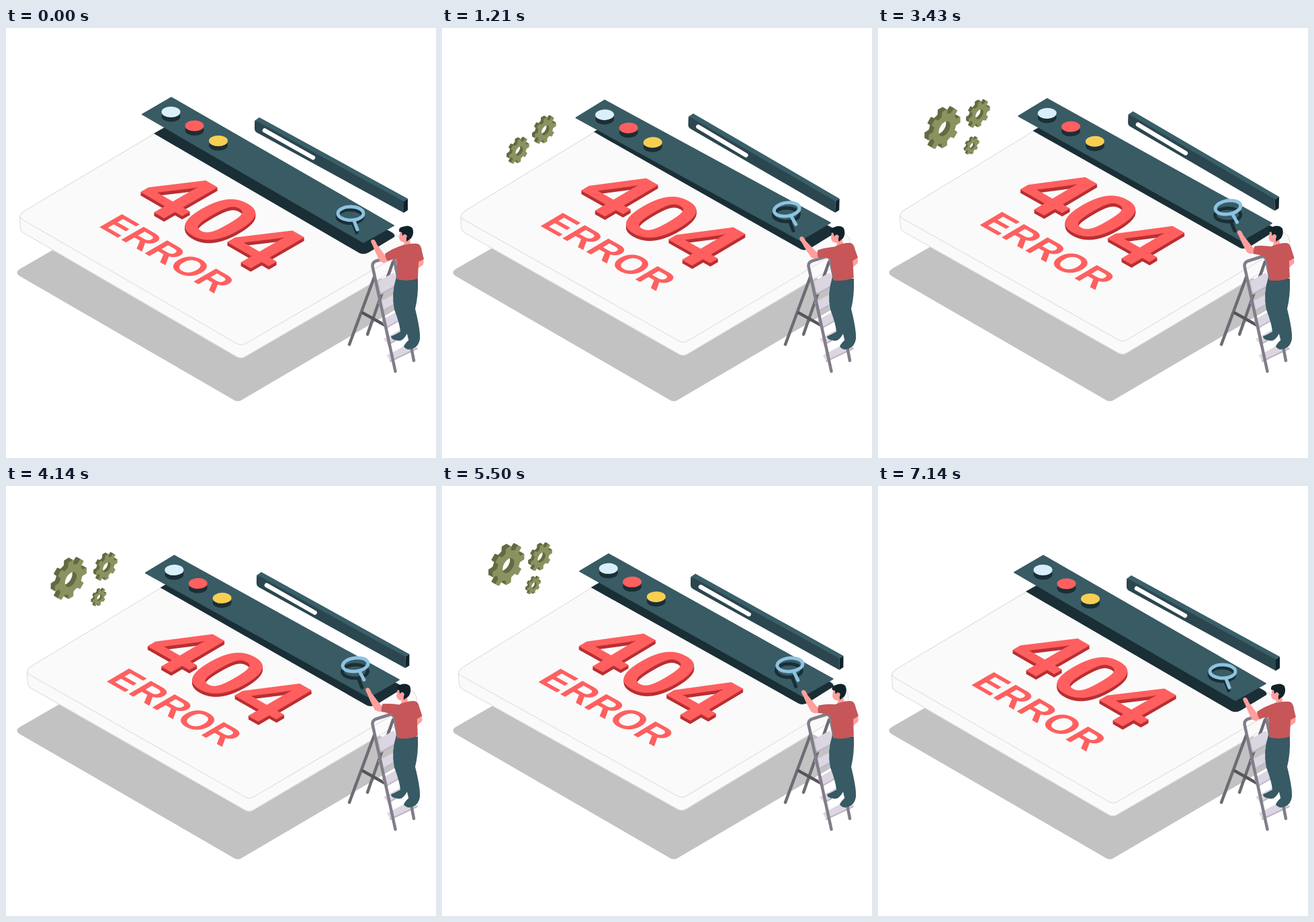
These frames come from a looping animation (640 px wide and 640 px high, 7210 ms). An HTML page:

```html
<!DOCTYPE html>
<html lang="en">
<head>
<meta charset="utf-8">
<title>404 error</title>
<style>
  html, body { margin: 0; width: 100%; height: 100%; overflow: hidden; background: #fff; }
  svg { display: block; width: 100%; height: 100%; }
  text { font-family: "Liberation Sans", Arial, sans-serif; font-weight: bold; }
  .line { fill: none; stroke-linecap: round; stroke-linejoin: round; }
</style>
</head>
<body>
<svg viewBox="0 0 640 640">
  <defs>
    <text id="code" font-size="134" transform="matrix(.866 .5 -.866 .5 182 252.5)">404</text>
    <path id="gear" fill-rule="evenodd"/>
    <g id="glass" class="line" stroke-width="5">
      <ellipse cx="513" cy="276" rx="19" ry="10"/>
      <path d="M518 287L523 300"/>
    </g>
  </defs>

  <path fill="#c2c2c2" d="M20 359L270 215L590 390Q602 400 592 412L352 553Q345 558 338 553L20 369Q13 364 20 359Z"/>

  <g id="slab">
    <path fill="#fafafa" stroke="#e0e0e0" stroke-width="1.2" d="M20.500 283Q20 277 28 272L262 133L594 315Q600 319 600 325V340Q600 347 594 351L356 489Q350 493 343 489L28 306Q22 303 21.500 298Z"/>
    <path class="line" stroke="#e0e0e0" stroke-width="1.2" d="M21 281Q22 284 26 286L344 470Q350 473 356 470L596 331"/>
    <path fill="#1a2e35" d="M220 157L262 133L574 304Q580 308 578 311L540 334Q533 338 526 335Z"/>
    <g id="codeStack"></g>
    <text font-size="56" fill="#ff5f5f" transform="matrix(.866 .5 -.866 .5 136 294.500)">ERROR</text>
  </g>

  <g id="strip">
    <path fill="#2b464f" d="M370 142Q370 136 376 138L592 257V275L374 156Q370 154 370 150Z"/>
    <path fill="#395f69" d="M370 138L377 133L598 254L592 258L374 139Q371 138 370 141Z"/>
    <path fill="#10232a" d="M592 258L598 254V271L592 275Z"/>
    <path class="line" stroke="#fff" stroke-width="6.500" d="M385 152.500L457 193"/>
  </g>

  <g id="bar">
    <path fill="#395b64" stroke="#395b64" stroke-width="2" stroke-linejoin="round" d="M246 103.500L203 128.500L532 319L577 294Z"/>
    <g id="buttons"></g>
    <use href="#glass" stroke="#1a2e35" x="-1" y="4.500"/>
    <use href="#glass" stroke="#8dc3e2" id="lens"/>
  </g>

  <g id="gears"></g>

  <g id="ladder">
    <g class="line" stroke="#6f6b74" stroke-width="4.500">
      <path d="M548 371L511 471M576 348L538 456"/>
      <path stroke="#57545b" d="M531 424L565 443"/>
    </g>
    <g fill="#dcd5e2">
      <path d="M554 377L577 364L586 380L558 396Z"/>
      <path d="M554 409L578 396L584 408L561 421Z"/>
      <path d="M559 435L582 422L587 434L565 447Z"/>
      <path d="M562 463L598 443L606 450L569 471Z"/>
      <path d="M567 487L603 468L612 476L572 496Z"/>
    </g>
    <path class="line" stroke="#bdb5c3" stroke-width="2" d="M572 496L612 477M558 396L580 384M561 421L582 409M565 447L584 436M569 471L580 465"/>
    <path class="line" stroke="#827d89" stroke-width="4.500" d="M579.500 511L546 357Q544 350 550 347L572 340Q576 339 578 345L607 495"/>
  </g>

  <path fill="#375a64" d="M581 371L613 373Q614 398 609 418Q617 450 616 463Q614 474 606 477Q597 481 592 474Q594 469 600 464L597 455Q590 468 582 465Q573 464 573 459Q580 456 587 452Q586 440 578 419Q573 395 581 371Z"/>
  <g id="torso">
    <path fill="#ff9f9d" d="M613 345L621 342Q622 349 621 352L613 358Z"/>
    <g id="head">
      <path fill="#ff9f9d" d="M587 301L585 312Q586 319 593 319L592 324Q598 327 602 322L601 310L597 302Z"/>
      <path fill="#10232a" d="M585 303Q584 297 590 296Q600 292 605 298Q608 306 603 313L596 318Q595 313 597 309L590 309L589 304Z"/>
      <ellipse cx="593.500" cy="310.500" rx="2.800" ry="3.500" fill="#ff9f9d"/>
    </g>
    <path fill="#c75658" d="M590 324Q601 320 612 321Q618 322 619 332L622 344L614 348L613 373Q598 378 582 374Q583 355 580 340Z"/>
    <g id="upperArm">
      <path class="line" stroke="#ff9f9d" stroke-width="9" d="M573 339L562 345"/>
      <g id="forearm" fill="#ff9f9d">
        <path d="M557 348Q550 335 546 324Q541 316 545 315Q549 313 552 322L566 341Q565 349 557 348Z"/>
      </g>
      <path fill="#c75658" d="M594 322Q575 328 564 336Q565 343 568 347Q577 343 591 343Z"/>
    </g>
  </g>
</svg>

<script>
const LOOP = 7210;
const TIMES = [0, 1210, 2430, 3430, 4860, 6140, 7140];
const $ = id => document.getElementById(id);

function add(parent, tag, attributes) {
  const node = document.createElementNS("http://www.w3.org/2000/svg", tag);
  for (const name in attributes) node.setAttribute(name, attributes[name]);
  return parent.appendChild(node);
}

// Copies a shape along an offset, the lit face last.
function extrude(parent, href, depth, dx, dy, side, face) {
  for (let i = depth; i >= 0; i--)
    add(parent, "use", { href, x: dx * i, y: dy * i, fill: i ? side : face });
}

function gearPath(teeth, outer, inner, hole) {
  const points = [];
  for (let i = 0; i < teeth; i++)
    for (const [part, r] of [[-.3, inner], [-.2, outer], [.2, outer], [.3, inner]]) {
      const a = (i + part) / teeth * 2 * Math.PI;
      points.push((r * Math.cos(a)).toFixed(2) + " " + (r * Math.sin(a)).toFixed(2));
    }
  return `M${points.join("L")}ZM${hole} 0A${hole} ${hole} 0 1 0 ${-hole} 0A${hole} ${hole} 0 1 0 ${hole} 0Z`;
}

// Smooth curve through values at TIMES, at rest at both ends.
function along(values, t) {
  const last = TIMES.length - 1;
  if (t >= TIMES[last]) return values[last];
  const i = TIMES.findIndex(time => time > t) - 1;
  const slope = k => k <= 0 || k >= last ? 0
    : (values[k + 1] - values[k - 1]) / (TIMES[k + 1] - TIMES[k - 1]);
  const span = TIMES[i + 1] - TIMES[i], u = (t - TIMES[i]) / span, v = 1 - u;
  return v * v * (1 + 2 * u) * values[i] + u * u * (3 - 2 * u) * values[i + 1]
    + span * u * v * (v * slope(i) - u * slope(i + 1));
}

const smooth = u => { u = Math.min(1, Math.max(0, u)); return u * u * (3 - 2 * u); };

const still = [0, 0, 0, 0, 0, 0, 0];
const parts = [
  { id: "slab", pivot: [300, 300], x: [0, 7.5, 10.5, 12.2, 8.2, .5, 0],
    y: [0, -3.3, -3.3, -5, -7.6, -6, 0], turn: [0, -.63, -.95, -.72, -.4, -1.43, 0] },
  { id: "bar", pivot: [390, 215], x: [0, -1.2, 6.8, 7.6, 4.7, 2.2, 0],
    y: [0, .5, 3.4, -.4, -3.8, -3.6, 0], turn: [0, -1.43, -.9, -.9, -1, -.5, 0] },
  { id: "lens", pivot: [513, 276], x: [0, 0, -.7, -.5, 0, 1, 0],
    y: [0, -3.4, -7.5, -6.7, -4.5, -3.4, 0], turn: [0, -7, -7, -8, -4, -4, 0] },
  { id: "strip", pivot: [484, 204], x: [0, -5, -5.5, .5, 3, -3.5, 0],
    y: [0, -3, -6.5, -6, -2.7, -1.3, 0], turn: [0, 1.5, 2, 1.6, -.7, 1.4, 0] },
  { id: "torso", pivot: [597, 374], turn: [0, -5.5, -4, -4.5, -4.5, -3, 0] },
  { id: "head", pivot: [597, 322], turn: [0, 0, 6, 7, 4, 0, 0] },
  { id: "upperArm", pivot: [588, 330], turn: [0, 20.5, 31.6, 33, 33, 20, 0] },
  { id: "forearm", pivot: [561, 346], turn: [0, -22.6, -32.6, -30, -29, -21, 0] }
];

const bigGearX = [121, 113, 104, 96, 93, 100, 105];
const gears = [
  { size: .67, start: 550, end: 6080, x: t => 153.6 - .00135 * t, y: t => 164 - .0107 * t },
  { size: 1, start: 870, end: 6465, x: t => along(bigGearX, t), y: t => 200.4 - .0152 * t },
  { size: .43, start: 1250, end: 6880, x: t => 145 - .0017 * t, y: t => 220 - .0132 * t }
];
const GROW = 580;

$("gear").setAttribute("d", gearPath(8, 27.5, 20.5, 10));
$("gear").setAttribute("transform", "matrix(.866 -.5 0 1 3 1.7)");
for (const gear of gears) {
  gear.node = add($("gears"), "g", {});
  extrude(gear.node, "#gear", 7, -.9, -.5, "#646a43", "#8a9360");
}
extrude($("codeStack"), "#code", 5, 0, 1, "#b92f32", "#ff5f5f");
for (const [cx, cy, fill] of [[245.5, 125, "#d9effb"], [280.5, 145.5, "#ff5f5f"], [316, 168, "#f9cf52"]]) {
  add($("buttons"), "ellipse", { cx, cy: cy + 6.5, rx: 14, ry: 8, fill: "#1a2e35" });
  add($("buttons"), "ellipse", { cx, cy, rx: 14, ry: 8, fill });
}

function draw() {
  const t = performance.now() % LOOP;
  for (const { id, pivot, x = still, y = still, turn } of parts)
    $(id).setAttribute("transform",
      `translate(${along(x, t)} ${along(y, t)}) rotate(${along(turn, t)} ${pivot})`);
  for (const { node, size, start, end, x, y } of gears) {
    const scale = size * smooth((t - start) / GROW) * smooth((end - t) / GROW);
    node.setAttribute("visibility", scale > 0 ? "visible" : "hidden");
    node.setAttribute("transform", `translate(${x(t)} ${y(t)}) scale(${scale})`);
  }
  requestAnimationFrame(draw);
}
draw();
</script>
</body>
</html>
```
